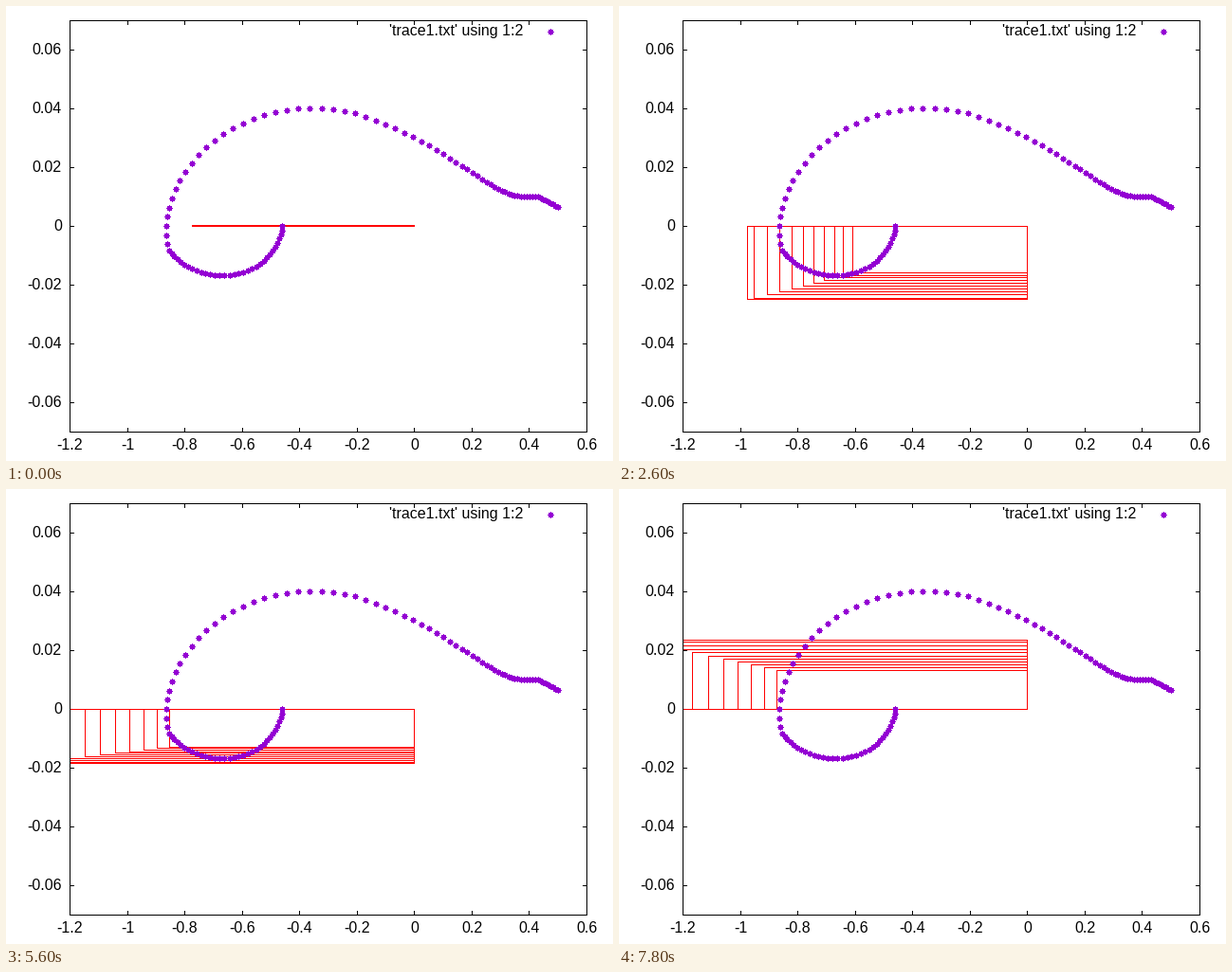
A matplotlib script that plays this animation: 640 by 480 pixels, repeating every 8 s.

```python
import matplotlib.pyplot as plt
import numpy as np
from matplotlib.animation import FuncAnimation
from matplotlib.collections import LineCollection, PolyCollection

W, H, DPI = 640, 480, 100
PX = 72 / DPI                                   # one pixel in points
LEFT, RIGHT, TOP, BOTTOM = 67, 612, 15, 449     # plot border
X0, Y0 = 430.3, 232                             # the data point (0, 0)
FRAMES, STEP_MS = 40, 200
RED, PURPLE = "#ff0000", "#9400d3"
plt.rcParams["text.hinting"] = "default"


def arc(first, last, keys):
    """Points first..last on the polynomial through evenly spread keys."""
    at = np.linspace(0, 1, len(keys))
    px, py = np.polyfit(at, keys, len(keys) - 1).T
    u = np.linspace(0, 1, last - first + 1)
    return np.column_stack([np.polyval(px, u), np.polyval(py, u)])


trace = np.vstack([
    arc(0, 32, [(291.4, 232), (275.2, 265.4), (240.5, 283.4), (200.8, 279.3), (172.3, 258)]),
    arc(33, 60, [(170.3, 251), (182.2, 186), (234, 132.3), (311.3, 108.2), (389.5, 121)]),
    arc(60, 92, [(389.5, 121), (461, 156.3), (506.5, 185.5), (536.3, 199.6), (561, 200.5)])[1:],
    arc(93, 100, [(563.5, 202), (582, 212.5)]),
])

# Exponent steps of the nested boxes; the last one is cut short
LEVELS = np.append(np.arange(1, 11), 10.45)

fig = plt.figure(figsize=(W / DPI, H / DPI), dpi=DPI, facecolor="white")
ax = fig.add_axes([0, 0, 1, 1])
ax.set_xlim(0, W)
ax.set_ylim(H, 0)
ax.axis("off")


def add_lines(color, zorder, segments=()):
    lines = LineCollection(segments, colors=color, linewidths=PX, antialiaseds=False,
                           capstyle="projecting", zorder=zorder, snap=False)
    return ax.add_collection(lines, autolim=False)


def box(x1, y1, x2, y2):
    return np.array([(x1, y1), (x2, y1), (x2, y2), (x1, y2), (x1, y1)]) + 0.5


def label(x, y, text, ha):
    ax.text(x, y, text, ha=ha, va="baseline", family="Liberation Sans",
            fontsize=16 * PX, color="black", zorder=5)


def add_axes():
    ticks = []
    for i in range(10):
        x = round(LEFT + i * (RIGHT - LEFT) / 9)
        ticks += [[(x, TOP), (x, TOP + 4)], [(x, BOTTOM), (x, BOTTOM - 4)]]
        label(x + 0.5, 468, f"{(i - 6) / 5:g}", "center")
    for i in range(-3, 4):
        y = Y0 - 62 * i
        ticks += [[(LEFT, y), (LEFT + 4, y)], [(RIGHT, y), (RIGHT - 4, y)]]
        label(59, y + 5, f"{i / 50:g}", "right")
    add_lines("black", 1, np.array(ticks) + 0.5)
    add_lines("black", 4, [box(LEFT, TOP, RIGHT, BOTTOM)])


def add_dots(points):
    # A 5 px square with a 1 px spike on each side
    side = np.array([3.5 - 0.5j, 3.5 + 0.5j, 2.5 + 0.5j, 2.5 + 2.5j, 0.5 + 2.5j])
    outline = np.concatenate([side * 1j ** k for k in range(4)])
    shape = np.column_stack([outline.real, outline.imag])
    ax.add_collection(PolyCollection([shape + p + 0.5 for p in np.round(points)],
                                     facecolors=PURPLE, edgecolors="none", snap=False,
                                     antialiaseds=False, zorder=3), autolim=False)


add_axes()
label(545, 31, "'trace1.txt' using 1:2", "right")
add_dots(np.vstack([trace, (574, 27)]))
rects = add_lines(RED, 2)


def draw(n):
    # Scale the current trace point away from the origin, with a slight drift upwards
    x, y = trace[n]
    scale = np.exp((0.05 - 1e-6 * n * n) * LEVELS)
    reach = (X0 - x) * scale
    rise = (Y0 - y) * scale + reach * 5.2e-5 * n * LEVELS
    xs = np.maximum(np.round(X0 - reach), LEFT)
    ys = np.round(Y0 - rise)
    ys[ys == Y0] = Y0 - 1       # a flat box still shows two rows
    rects.set_segments([box(left, Y0, 430, edge) for left, edge in zip(xs, ys)])
    return [rects]


anim = FuncAnimation(fig, draw, frames=FRAMES, interval=STEP_MS,
                     repeat=True, repeat_delay=0, blit=False)
plt.show()
```
